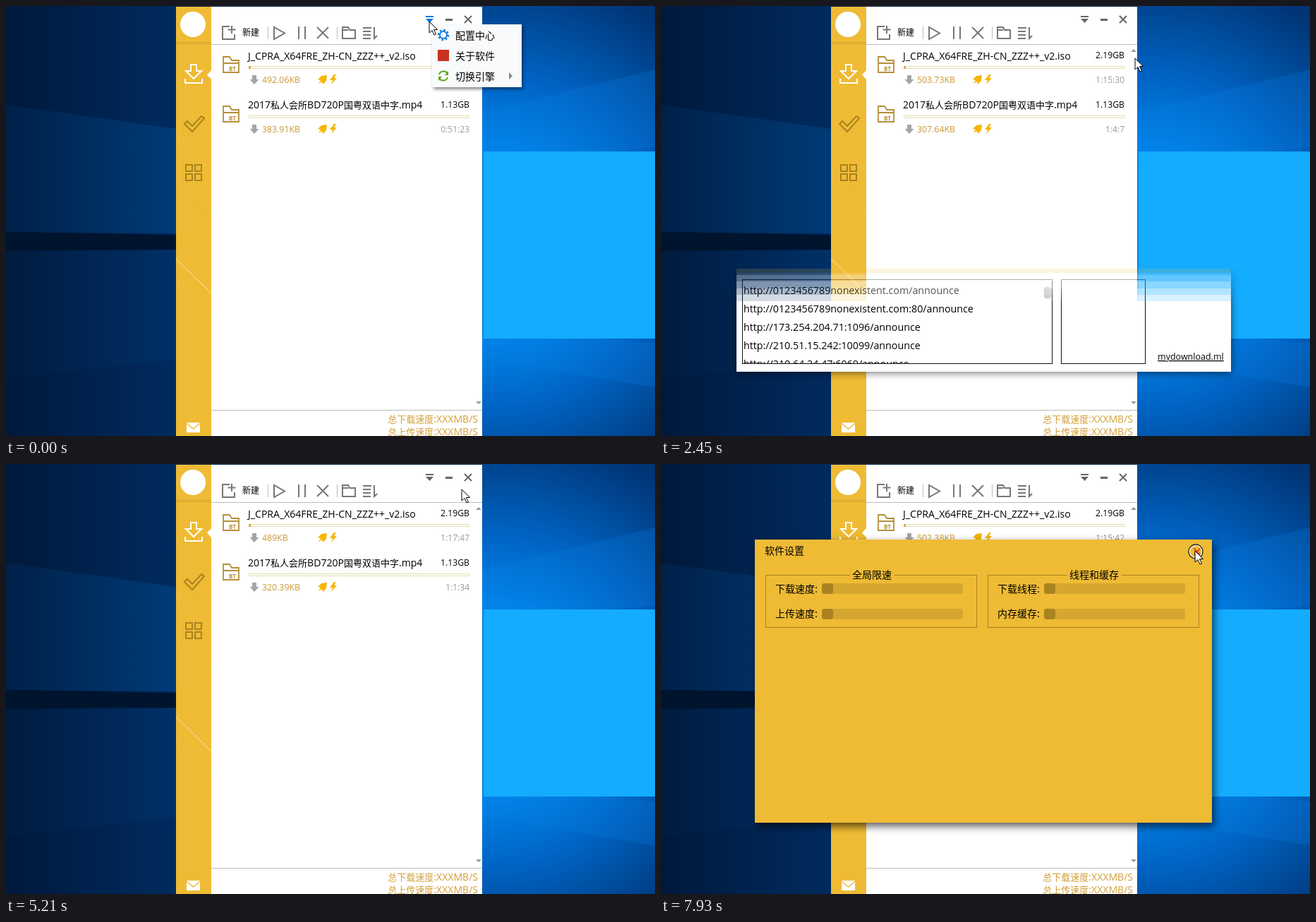
These frames come from a looping animation (920x609 px, 8 s). An HTML page:

```html
<!DOCTYPE html>
<html lang="zh-CN">
<head>
<meta charset="utf-8">
<title>Download manager</title>
<style>
  html, body { margin: 0; width: 100%; height: 100%; overflow: hidden; background: #001c40; }
  svg { display: block; width: 920px; height: 609px; }
  text { font-family: "Open Sans", "Noto Sans CJK SC", sans-serif; white-space: pre; }
  .line { fill: none; stroke: #777; stroke-width: 2; }
  .side { fill: none; stroke: #a9831f; stroke-width: 2; }
  .popup { fill: #f8fafb; filter: drop-shadow(2px 3px 2px rgba(0,0,0,.45)); }
  .about { filter: drop-shadow(0 1px 6px rgba(0,0,0,.6)); }
  .settings { filter: drop-shadow(3px 5px 6px rgba(0,0,0,.65)); }
  .glow { font-weight: 700; letter-spacing: .17px; fill: #fff; filter: drop-shadow(1px 1px 1px rgba(40,25,0,.75)); }
</style>
</head>
<body>
<svg id="stage" viewBox="0 0 920 609"></svg>
<script>
const stage = document.getElementById('stage');
const GOLD = '#efbb35', BROWN = '#a9831f';

// Latin runs sit slightly larger than the Chinese characters around them.
const mixed = (s, size) => s.replace(/[\x21-\x7e]+/g, run =>
  `<tspan font-size="${(size * 1.08).toFixed(2)}">${run}</tspan>`);
const text = (x, y, s, size, attrs = '') =>
  `<text x="${x}" y="${y}" font-size="${size}" ${attrs}>${mixed(s, size)}</text>`;
const plain = (x, y, s, size, attrs = '') =>
  `<text x="${x}" y="${y}" font-size="${size}" ${attrs}>${s}</text>`;
const rect = (x, y, w, h, fill, attrs = '') =>
  `<rect x="${x}" y="${y}" width="${w}" height="${h}" fill="${fill}" ${attrs}/>`;
const path = (d, attrs = 'class="line"') => `<path d="${d}" ${attrs}/>`;
const cross = (x, y, r, attrs) =>
  path(`M${x - r} ${y - r}l${2 * r} ${2 * r}m0 ${-2 * r}l${-2 * r} ${2 * r}`, attrs);
const gradient = (id, from, to) =>
  `<linearGradient id="${id}"><stop stop-color="${from}"/><stop offset="1" stop-color="${to}"/></linearGradient>`;

// The wipe edge fades in visible bands.
const BANDS = 5;
const bandStops = Array.from({ length: BANDS + 1 }, (_, i) =>
  [i, i + 1].map(level => {
    const grey = Math.round(255 * level / (BANDS + 1));
    return `<stop offset="${i / BANDS}" stop-color="rgb(${grey},${grey},${grey})"/>`;
  }).join('')).join('');

const desktop = `
  <defs>
    ${gradient('left', '#00193b', '#002b5f')}
    ${gradient('upper', '#002048', '#003b78')}
    ${gradient('lower', '#001b3e', '#003068')}
    <radialGradient id="right" gradientUnits="userSpaceOnUse" cx="690" cy="335" r="390">
      <stop offset=".35" stop-color="#0084ea"/><stop offset=".6" stop-color="#0064c4"/>
      <stop offset="1" stop-color="#003474"/></radialGradient>
    <linearGradient id="wipe" gradientUnits="userSpaceOnUse" color-interpolation="sRGB" x1="0" x2="0">
      ${bandStops}</linearGradient>
    <mask id="reveal" maskUnits="userSpaceOnUse" x="0" y="0" width="920" height="609">
      ${rect(0, 0, 920, 609, 'url(#wipe)')}</mask>
  </defs>
  ${rect(0, 0, 241, 609, 'url(#left)')}
  ${path('M0 140L241 174V322L0 320Z', 'fill="url(#upper)"')}
  ${path('M0 346H241V500L0 528Z', 'fill="url(#lower)"')}
  ${path('M0 320L241 324V345L0 347Z', 'fill="#00142e"')}
  ${rect(241, 0, 434, 1, '#00244e')}
  ${rect(675, 0, 245, 609, 'url(#right)')}
  ${path('M675 150L920 90V200L675 222Z', 'fill="#0a7ce0" opacity=".25"')}
  ${path('M675 455L920 478V540L675 500Z', 'fill="#0a7ce0" opacity=".25"')}
  ${rect(677, 206, 265, 265, '#14acff')}`;

const sidebar = `
  ${rect(241, 1, 50, 608, GOLD)}
  ${path('M241 358l50 49', 'stroke="#f6d887" stroke-width="2" opacity=".6"')}
  ${path('M241 183l50 49M241 240l50 50M241 388l50 49', 'stroke="#f6d887" opacity=".25"')}
  <circle cx="265" cy="26" r="18" fill="#fff"/>
  ${path('M241 51.5h50M243 53.5h48', 'stroke="#b98f2b" stroke-dasharray="2 2"')}
  ${path('M291 91l-6 6.5l6 6.5Z', 'fill="#fff"')}
  ${path('M262 83h8v9h7l-11 11l-11-11h7ZM254 103v6h24v-6', 'class="side" style="stroke:#fff"')}
  ${path('M253 167l4-4l7 7l13-14l4 3l-17 19Z', 'class="side"')}
  ${path('M255 225h9v9h-9ZM268 225h9v9h-9ZM255 238h9v9h-9ZM268 238h9v9h-9Z', 'class="side"')}
  ${rect(256, 590, 19, 14, '#fff')}
  ${path('M256 591l9.500 8l9.500-8', `fill="none" stroke="${GOLD}" stroke-width="1.500"`)}`;

const toolbar = `
  ${path('M317 29h-10v18h17v-7M320 28v11M314.500 33.500h11')}
  ${text(335, 42, '新建', 12)}
  ${path('M371.500 29v18M469.500 29v18', 'stroke="#bbb"')}
  ${path('M380 30v17l15-8.500ZM415 29v18M424 29v18')}
  ${cross(449, 38, 8, 'class="line"')}
  ${path('M477 46V30h8l2 4h8v12ZM485 34h-8M506 31h12M506 36h11M506 41h11M506 46h11M522 30v16l4-4')}
  <g id="menuButton" fill="#666">${rect(595, 14, 11, 2, 'inherit')}${path('M595 18h11l-5.500 6Z', '')}</g>
  ${rect(623, 18, 10, 3, '#666')}
  ${cross(655, 19, 5, 'class="line" style="stroke:#666"')}
  ${path('M291 54.500h384M291 572.500h384', 'stroke="#bdbdbd"')}
  ${path('M666 65h8l-4-4ZM666 560h8l-4 4Z', 'fill="#999"')}
  ${text(669, 590, '总下载速度:XXXMB/S', 13, 'fill="#d39f37" text-anchor="end"')}
  ${text(669, 608, '总上传速度:XXXMB/S', 13, 'fill="#d39f37" text-anchor="end"')}`;

const task = (n, dy, title, size) => `
  <g transform="translate(0 ${dy})">
    ${path('M308 94V72h9l3 5h10v17ZM308 81h22', 'fill="none" stroke="#b58f39" stroke-width="1.800"')}
    ${plain(321, 92, 'BT', 8, 'fill="#b58f39" font-weight="700" text-anchor="middle"')}
    ${text(343, 76 - n, title, 13)}
    ${plain(657, 74, size, 12.2, 'text-anchor="end"')}
    ${rect(344.5, 85.5, 312, 3, '#fffef8', 'stroke="#e3ddb2"')}
    ${n ? '' : rect(344, 85, 3, 4, '#d9b04b')}
    ${path('M349 98h6v6h3.500l-6.500 7l-6.500-7h3.500Z', 'fill="#a5a5a5"')}
    <text id="speed${n}" x="363" y="109" font-size="12.3" fill="#cc9a35"/>
    ${path('M455 98l-8 1l-5 5l4 1l-3 5l5-3l1 4l5-5ZM465 97l-6 8h4l-2 6l8-9h-4l3-5Z', 'fill="#f7b500"')}
    <text id="left${n}" x="657" y="109" font-size="12" fill="#999" text-anchor="end"/>
  </g>`;

const menuItem = (id, x, y, w, label, tx) => `
  <g id="${id}">${rect(x, y, w, 29, '#efc05a', 'class="hover"')}${text(tx, y + 20, label, 14)}</g>`;

const menus = `
  <g id="menu">
    <rect class="popup" x="604" y="26" width="127" height="89"/>
    ${['配置中心', '关于软件', '切换引擎'].map((s, i) => menuItem('item' + i, 605, 27 + 29 * i, 125, s, 637)).join('')}
    <circle cx="620" cy="41" r="5" fill="none" stroke="#0a7be0" stroke-width="2"/>
    <circle cx="620" cy="41" r="7" fill="none" stroke="#0a7be0" stroke-width="2.500" stroke-dasharray="2.500 3"/>
    ${rect(612, 62, 16, 16, '#c8321e')}
    ${path('M614 97a6.500 6.500 0 0 1 12-1M626 101a6.500 6.500 0 0 1-12 1', 'fill="none" stroke="#5ea51c" stroke-width="2"')}
    ${path('M627 92v6h-5ZM613 106v-6h5Z', 'fill="#5ea51c"')}
    ${path('M713 94l5 5l-5 5Z', 'fill="#888"')}
  </g>
  <g id="submenu">
    <rect class="popup" x="737" y="84" width="117" height="60"/>
    ${['跨林引擎', '禾尺引擎'].map((s, i) => menuItem('engine' + i, 738, 85 + 29 * i, 115, s, 770)).join('')}
    ${path('M748 99l4 4l8-7', 'class="line" style="stroke:#888"')}
  </g>`;

const facts = [
  [201, '主程序版本：20171026'],
  [236, '软件界面引擎：EXDUI版本：3.0.16.129'],
  [267, '软件下载引擎：DLBT:3.7.8、DLHTTP:3.3、KuaLin:3.2.1.48、Aria2：暂未启用'],
  [299, '软件支持协议：HTTP、FTP、BT、Magnet（eMule目前无法实现，在未来支持解析下载网盘与其它）'],
  [331, '软件免责说明：1.程序非盈利项目，禾尺和跨林下载引擎属于接口形式调用，部分功能为他们收费项目本软件暂时无法实现（可'],
  [346, '以扫描下方二维码尽绵薄之力）。2.所有下载资源均来源于网络共享资源，作者无法通过技术手段拦截非法文件的下载和传播。'],
  [361, '3.程序因编写软件原因报毒和无法显示中文表以外的文字属于正常现象待解决中。4.做种可以使用以下搜集的Tracker服务器：']
];
const trackers = ['0123456789nonexistent.com', '0123456789nonexistent.com:80',
  '173.254.204.71:1096', '210.51.15.242:10099', '210.64.24.47:6969'];

const about = `
  <g id="about" mask="url(#reveal)">
    <g class="about">${rect(107, 107, 701, 411, '#fff')}</g>
    ${rect(107, 107, 701, 271, GOLD)}
    ${cross(787, 125, 4.5, 'id="aboutClose" stroke="#78683c" stroke-width="2"')}
    <g class="glow">
      ${plain(121, 161, 'Wuvo', 24)}
      ${facts.map(([y, s]) => text(119, y, s, 12)).join('')}
    </g>
    ${text(276, 200, '查看更新', 12, 'text-decoration="underline"')}
    ${rect(115.5, 387.5, 439, 119, '#fff', 'stroke="#111"')}
    <svg x="116" y="388" width="438" height="118" viewBox="116 388 438 118" style="width:438px;height:118px">
      ${trackers.map((s, i) => plain(117, 408 + 26 * i, `http://${s}/announce`, 14.25)).join('')}
    </svg>
    ${rect(543, 398, 10, 16, '#c6c6c6', 'rx="4" stroke="#aaa" stroke-width=".5"')}
    ${rect(567.5, 387.5, 119, 119, '#fff', 'stroke="#111"')}
    ${plain(704, 501, 'mydownload.ml', 12.5, 'text-decoration="underline"')}
  </g>`;

const group = (x, title, gap, labels) => `
  ${rect(x + .5, 157.5, 299, 74, 'none', `stroke="${BROWN}"`)}
  ${rect(x + 151 - gap / 2, 155, gap, 5, GOLD)}
  ${text(x + 151, 162, title, 14, 'text-anchor="middle"')}
  ${labels.map((s, i) => text(x + 14, 182 + 35 * i, s, 14) +
    rect(x + 80, 169 + 36 * i, 200, 15, '#d6a730', 'rx="3"') +
    rect(x + 80, 169 + 36 * i, 16, 15, BROWN, 'rx="4"')).join('')}`;

const settings = `
  <g id="settings" mask="url(#reveal)">
    <g class="settings">${rect(133, 107, 648, 401, GOLD)}</g>
    ${text(147, 128, '软件设置', 14)}
    ${group(148, '全局限速', 63, ['下载速度:', '上传速度:'])}
    ${group(463, '线程和缓存', 77, ['下载线程:', '内存缓存:'])}
    ${cross(760, 124, 4.5, 'id="settingsClose" stroke="#78683c" stroke-width="2"')}
  </g>`;

const pointer = `
  <g id="ring"><circle cx="758" cy="124" r="9" fill="none" stroke="#fff" stroke-width="2"/>
    <circle cx="758" cy="124" r="10" fill="none" stroke="#222" stroke-width="1.300"/></g>
  ${path('M0 0V16l4-3.500l3 6.500l2.500-1l-3-6.500h5Z', 'id="cursor" fill="#fff" stroke="#000"')}`;

stage.innerHTML = desktop + rect(291, 1, 384, 608, '#fff') + sidebar + toolbar +
  task(0, 0, 'J_CPRA_X64FRE_ZH-CN_ZZZ++_v2.iso', '2.19GB') +
  task(1, 70, '2017私人会所BD720P国粤双语中字.mp4', '1.13GB') +
  menus + about + settings + pointer;

const ui = {};
stage.querySelectorAll('[id]').forEach(el => ui[el.id] = el);

const LOOP = 8000;
// Screen updates come in bursts: start, end, number of updates.
const bursts = [[150, 1090, 7], [1520, 2450, 8], [2570, 3590, 9], [3860, 4820, 8],
  [4940, 5900, 8], [6060, 7030, 8], [7150, 7930, 7]];
const moves = [[150, 600, 22], [463, 690, 98], [777, 851, 112], [1090, 780, 106], [1520, 780, 106],
  [1790, 679, 83], [2190, 668, 72], [2450, 672, 74], [2570, 672, 74], [3590, 554, 250],
  [3860, 554, 250], [4820, 787, 125], [4940, 787, 125], [5210, 646, 36], [5490, 602, 13],
  [5900, 650, 44], [6340, 658, 45], [6610, 677, 44], [7030, 690, 236], [7150, 690, 236], [7930, 757, 123]];
const edges = [[2320, 680], [2450, 418], [2700, 60], [4820, 60], [4940, 260], [5080, 680],
  [6610, 680], [6750, 418], [7030, 60]];
const readings = [
  [0, '492.06KB', '1:17:17', '383.91KB', '0:51:23'],
  [620, '503.73KB', '1:15:30', '307.64KB', '1:4:7'],
  [2690, '500.69KB', '1:15:58', '307.64KB', '1:4:7'],
  [4270, '489KB', '1:17:47', '320.39KB', '1:1:34'],
  [6060, '491.67KB', '1:17:21', '316.09KB', '1:2:21'],
  [7400, '502.38KB', '1:15:42', '316.09KB', '1:2:21']];

function track(keys, t) {
  const i = keys.findIndex(k => k[0] > t);
  if (i <= 0) return keys[i < 0 ? keys.length - 1 : 0].slice(1);
  const a = keys[i - 1], b = keys[i], p = (t - a[0]) / (b[0] - a[0]);
  return a.slice(1).map((v, j) => v + (b[j + 1] - v) * p);
}

function lastUpdate(t) {
  let last = 0;
  for (const [start, end, n] of bursts)
    for (let i = 0; i < n; i++) {
      const at = Math.round((start + (end - start) * i / (n - 1)) / 10) * 10;
      if (at <= t) last = at;
    }
  return last;
}

const show = (el, on) => el.style.display = on ? '' : 'none';
function highlight(id, on) {
  show(ui[id].querySelector('.hover'), on);
  ui[id].setAttribute('fill', on ? '#fff' : '#000');
}

function draw(t) {
  const [x, y] = track(moves, t), [edge] = track(edges, t);
  const near = (cx, cy, r) => Math.hypot(x - cx, y - cy) < r;
  ui.cursor.setAttribute('transform', `translate(${Math.round(x)} ${Math.round(y)})`);
  ui.menuButton.setAttribute('fill', near(600, 18, 9) ? '#0078d7' : '#666');

  show(ui.menu, t < 2190 || t > 5550 && t < 6480);
  show(ui.submenu, t >= 620 && t < 2190);
  for (let i = 0; i < 3; i++)
    highlight('item' + i, x > 604 && x < 731 && Math.floor((y - 27) / 29) === i);
  for (let i = 0; i < 2; i++)
    highlight('engine' + i, x > 737 && x < 854 && Math.floor((y - 85) / 29) === i);

  ui.wipe.setAttribute('y1', edge - 46);
  ui.wipe.setAttribute('y2', edge);
  // The first band must stay clear of the area not yet revealed.
  ui.reveal.setAttribute('y', edge - 46);
  ui.reveal.setAttribute('height', Math.max(0, 655 - edge));
  show(ui.about, edge < 660 && t < 5500);
  show(ui.settings, edge < 660 && t > 5500);
  ui.aboutClose.setAttribute('stroke', near(787, 125, 9) ? '#e8481c' : '#78683c');
  ui.settingsClose.setAttribute('stroke', near(758, 124, 9) ? '#e8481c' : '#78683c');
  show(ui.ring, t >= 7930);

  const now = readings.filter(r => r[0] <= t).pop();
  [ui.speed0, ui.left0, ui.speed1, ui.left1].forEach((el, i) => el.textContent = now[i + 1]);
}

let shown = -1;
function tick() {
  const t = lastUpdate(performance.now() % LOOP);
  if (t !== shown) draw(shown = t);
  requestAnimationFrame(tick);
}
tick();
</script>
</body>
</html>
```
